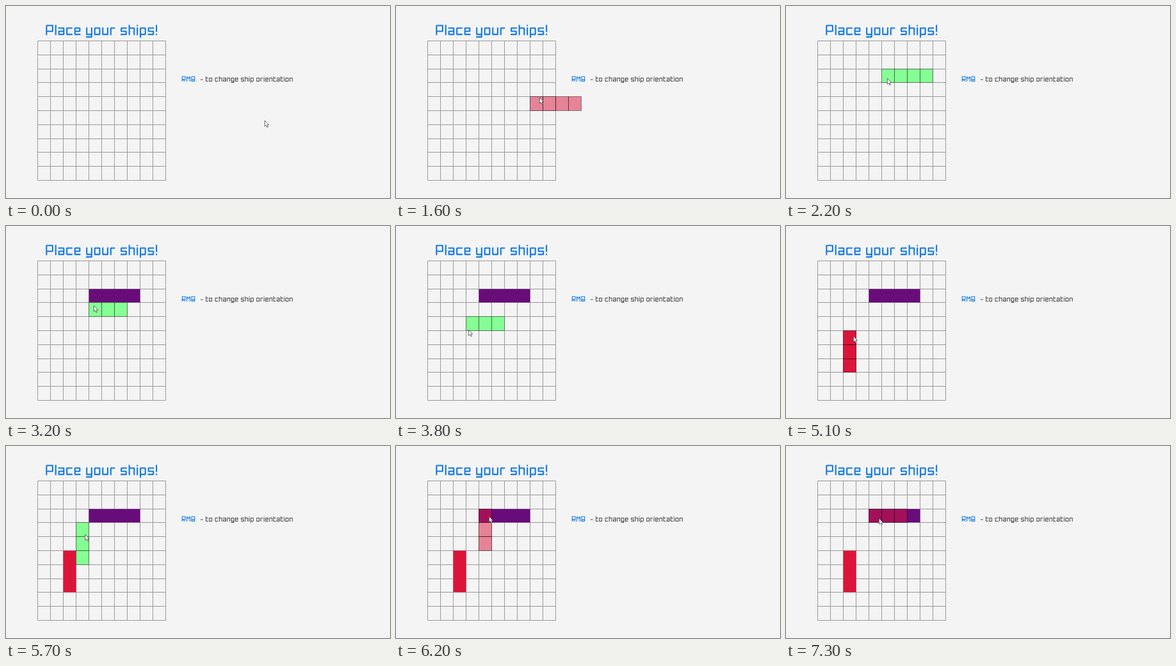
An HTML page for the animation above (8000 ms loop, 600 by 300 pixels).

```html
<!DOCTYPE html>
<html lang="en">
<head>
<meta charset="utf-8">
<title>Place your ships</title>
<style>
  html, body { margin: 0; width: 100%; height: 100%; overflow: hidden; background: #f4f4f4; }
  svg { display: block; width: 100%; height: 100%; }
  text { font-family: "Noto Sans Mono", monospace; fill: transparent; }
  .glyphs { fill: none; stroke-width: 2.1; stroke-linecap: square; stroke-linejoin: bevel; }
</style>
</head>
<body>
<svg id="stage" viewBox="0 0 600 300">
  <rect width="600" height="300" fill="#f4f4f4"/>
  <g id="labels"></g>
  <path id="grid" stroke="#999" fill="none"/>
  <rect id="longShip" fill="#680c79"/>
  <rect id="tallShip" fill="#dc1439"/>
  <g id="ghost" stroke="#000" stroke-opacity=".42"></g>
  <path id="cursor" d="M0 0V9.2L2.1 7.3L3.6 10.6L5.1 9.9L3.7 6.8H6.3Z"
        fill="#fff" stroke="#444" stroke-width=".8"/>
</svg>
<script>
const LOOP = 8000, STEP = 100, CELLS = 10;
const NS = 'http://www.w3.org/2000/svg';
const $ = id => document.getElementById(id);

function set(el, attrs) {
  for (const key in attrs) el.setAttribute(key, attrs[key]);
  return el;
}
const add = (parent, tag, attrs) =>
  set(parent.appendChild(document.createElementNS(NS, tag)), attrs);

// Letters are strokes through named points: lower case is the left edge,
// upper case the right edge, v the notch in the middle.
const LEVEL = { t: -14, x: -10, v: -8, m: -5, b: 0, d: 4 };
const GLYPHS = {
  P: 'btTMm', R: 'btTMmB', M: 'btvTB', B: 'btTBb mM',
  a: 'xXBbmM', c: 'XxbB', e: 'BbxXMm', g: 'BbxXDd', h: 'tb xXB',
  i: 'xb tt', l: 'tb', n: 'bxXB', o: 'bxXBb', p: 'dxXBb', r: 'bxX',
  s: 'XxmMBb', t: 'tbB xX', u: 'xbBX', y: 'xbB XDd', '!': 'tm bb', '-': 'mM'
};

function glyphWidth(ch) {
  if ('il!'.includes(ch)) return 0;
  if ('rt-'.includes(ch)) return 5.5;
  return ch < 'a' ? 9.6 : 7.7;
}

function glyphPath(ch, left) {
  const width = glyphWidth(ch);
  const point = p => {
    const level = p.toLowerCase();
    const x = p === 'v' ? width / 2 : p === level ? 0 : width;
    return `${left + x} ${LEVEL[level]}`;
  };
  return GLYPHS[ch].split(' ').map(s => 'M' + [...s].map(point).join('L')).join('');
}

function write(str, x, y, scale, color) {
  let pen = 1, d = '';
  for (const ch of str) {
    if (ch !== ' ') d += glyphPath(ch, pen);
    pen += ch === ' ' ? 6 : glyphWidth(ch) + 4.9;
  }
  add($('labels'), 'path', {
    d, class: 'glyphs', stroke: color, transform: `translate(${x} ${y}) scale(${scale})`
  });
  // Selectable copy of the lettering.
  add($('labels'), 'text', { x, y, 'font-size': 17 * scale }).textContent = str;
}

const colX = c => 49.5 + 20 * c;
const rowY = r => Math.round(54 + 21.8 * r) + .5;

function box({ c, r, w, h }) {
  return { x: colX(c), y: rowY(r), width: 20 * w, height: rowY(r + h) - rowY(r) };
}

function drawGrid() {
  let d = '';
  for (let i = 0; i <= CELLS; i++) {
    d += `M${colX(i)} ${rowY(0)}V${rowY(CELLS)}M${colX(0)} ${rowY(i)}H${colX(CELLS)}`;
  }
  $('grid').setAttribute('d', d);
}

// Places the pointer passes, with the time it gets there.
const STOPS = [
  { at: 0, x: 404, y: 179 },
  { at: 900, x: 403, y: 179 },
  { at: 1600, x: 224, y: 143 },
  { at: 2200, x: 158, y: 113 },
  { at: 2400, x: 145, y: 112 },
  { at: 3000, x: 145, y: 112 },
  { at: 3800, x: 113, y: 162 },
  { at: 3900, x: 105, y: 172 },
  { at: 5200, x: 105, y: 172 },
  { at: 6100, x: 138, y: 111 },
  { at: 6200, x: 145, y: 110 },
  { at: 6600, x: 145, y: 110 },
  { at: 6900, x: 145, y: 113 },
  { at: LOOP, x: 145, y: 113 }
];

function pointer(t) {
  const n = STOPS.findIndex(s => s.at > t);
  const a = STOPS[n - 1], b = STOPS[n];
  const k = (t - a.at) / (b.at - a.at);
  return { x: a.x + (b.x - a.x) * k, y: a.y + (b.y - a.y) * k };
}

const LONG = { at: 2900, c: 4, r: 2, w: 4, h: 1 };
const TALL = { at: 5100, c: 2, r: 5, w: 1, h: 3 };
const isUpright = t => t >= 4400 && t < 7200;

const overlaps = (a, b) =>
  a.c < b.c + b.w && b.c < a.c + a.w && a.r < b.r + b.h && b.r < a.r + a.h;

const visible = on => ({ visibility: on ? 'visible' : 'hidden' });

function drawGhost(t, { x, y }) {
  const c = Math.floor((x - 49.5) / 20), r = Math.floor((y - 54) / 21.8);
  const inside = c >= 0 && c < CELLS && r >= 0 && r < CELLS;
  const size = t < LONG.at ? 4 : 3;
  const [dc, dr] = isUpright(t) ? [0, 1] : [1, 0];
  const ship = { c, r, w: dc ? size : 1, h: dr ? size : 1 };
  const blocked = c + ship.w > CELLS || r + ship.h > CELLS ||
    [LONG, TALL].some(s => t >= s.at && overlaps(s, ship));
  const paint = blocked
    ? { fill: '#dc143c', 'fill-opacity': .5 }
    : { fill: '#85ff94', 'fill-opacity': 1 };

  cells.forEach((cell, i) => set(cell, {
    ...box({ c: c + dc * i, r: r + dr * i, w: 1, h: 1 }),
    ...paint,
    ...visible(inside && i < size)
  }));
}

function render(ms) {
  const t = Math.floor(ms % LOOP / STEP) * STEP;
  const tip = pointer(t);
  set($('longShip'), visible(t >= LONG.at));
  set($('tallShip'), visible(t >= TALL.at));
  drawGhost(t, tip);
  set($('cursor'), { transform: `translate(${tip.x + .4} ${tip.y})` });
}

write('Place your ships!', 62.3, 44.4, .995, '#1279e4');
write('RMB', 274.8, 117.4, .505, '#1279e4');
write('- to change ship orientation', 304, 117.4, .497, '#484848');
drawGrid();
set($('longShip'), box(LONG));
set($('tallShip'), box(TALL));
const cells = Array.from({ length: 4 }, () => add($('ghost'), 'rect', {}));

const start = performance.now();
function tick() {
  render(performance.now() - start);
  requestAnimationFrame(tick);
}
tick();
</script>
</body>
</html>
```
